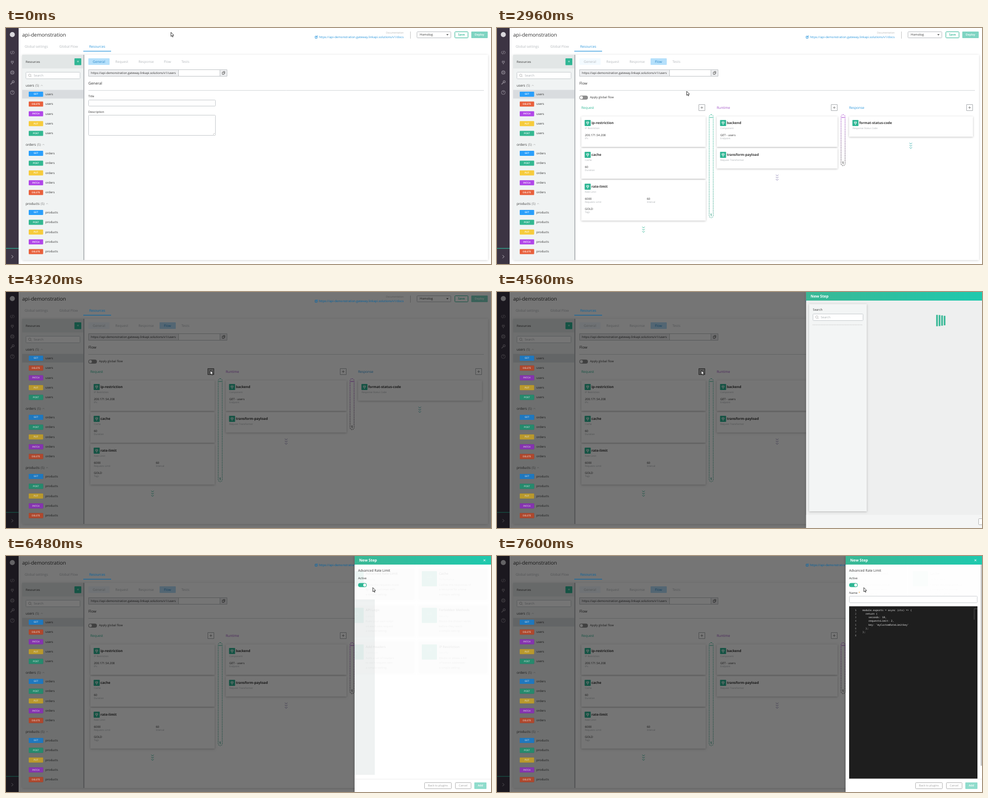
An HTML page with a canvas that plays this animation: 960x467 px, repeating every 8000 ms.

```html
<!DOCTYPE html>
<html lang="en">
<head>
<meta charset="utf-8">
<title>Gateway flow editor</title>
<style>
html, body { margin: 0; width: 100%; height: 100%; overflow: hidden; background: #fff; }
canvas { display: block; }
</style>
</head>
<body>
<canvas id="stage" width="960" height="467"></canvas>
<script>
const ctx = document.getElementById('stage').getContext('2d');
const LOOP = 8000, STEP = 80;
const SANS = '"Open Sans", "Noto Sans", sans-serif';
const MONO = '"Noto Sans Mono", "DejaVu Sans Mono", monospace';
const GREEN = '#2fb694', BLUE = '#2a96dc', INK = '#333', PALE = '#a9adb1';
const BADGE = { GET: '#2a9ffb', DELETE: '#e8603c', PATCH: '#b146e8', PUT: '#f6cb3c', POST: '#33b791' };
const URL_BASE = 'https://api-demonstration.gateway.linkapi.solutions/v1/';

const clamp = v => Math.max(0, Math.min(1, v));
const ease = v => v * v * (3 - 2 * v);
const span = (t, a, b) => clamp((t - a) / (b - a));

// y is the middle of the lowercase letters
function text(s, x, y, size, color = INK, o = {}) {
  ctx.font = `${o.italic ? 'italic ' : ''}${o.weight || 400} ${size}px ${o.font || SANS}`;
  ctx.textAlign = o.align || 'left';
  ctx.fillStyle = color;
  ctx.fillText(s, x, y + size * 0.31);
}
function box(x, y, w, h, fill, stroke, r = 0) {
  ctx.beginPath();
  ctx.roundRect(x, y, w, h, r);
  if (fill) { ctx.fillStyle = fill; ctx.fill(); }
  if (stroke) { ctx.strokeStyle = stroke; ctx.lineWidth = 1; ctx.stroke(); }
}
function line(points, color, width = 1, dash = []) {
  ctx.beginPath();
  points.forEach(([x, y], i) => i ? ctx.lineTo(x, y) : ctx.moveTo(x, y));
  ctx.strokeStyle = color;
  ctx.lineWidth = width;
  ctx.setLineDash(dash);
  ctx.stroke();
  ctx.setLineDash([]);
}
function ring(x, y, r, color, width = 1) {
  ctx.beginPath();
  ctx.arc(x, y, r, 0, 7);
  ctx.strokeStyle = color;
  ctx.lineWidth = width;
  ctx.stroke();
}
function dot(x, y, r, color) {
  ctx.beginPath();
  ctx.arc(x, y, r, 0, 7);
  ctx.fillStyle = color;
  ctx.fill();
}
function shadowed(draw, blur = 4, color = 'rgba(0,0,0,.24)', dy = 1) {
  ctx.save();
  ctx.shadowColor = color;
  ctx.shadowBlur = blur;
  ctx.shadowOffsetY = dy;
  draw();
  ctx.restore();
}
function faded(alpha, draw) {
  if (alpha <= 0) return;
  ctx.save();
  ctx.globalAlpha *= alpha;
  draw();
  ctx.restore();
}
function plug(x, y, k, color) {
  ctx.save();
  ctx.translate(x, y);
  ctx.scale(k, k);
  line([[-1.4, -3.6], [-1.4, -1.4]], color);
  line([[1.4, -3.6], [1.4, -1.4]], color);
  line([[-3, -1.2], [3, -1.2]], color);
  ctx.beginPath();
  ctx.arc(0, -0.8, 2.3, 0, Math.PI);
  ctx.stroke();
  line([[0, 1.5], [0, 3.8]], color);
  ctx.restore();
}
function glass(x, y) {
  ring(x, y, 2.4, '#aaa', 0.8);
  line([[x + 1.8, y + 1.8], [x + 3.6, y + 3.6]], '#aaa', 0.8);
}
function searchBox(x, y, w, h) {
  box(x + .5, y + .5, w, h, '#fff', '#c6cbce', 1);
  glass(x + 8, y + h / 2);
  text('Search', x + 16, y + h / 2 + .7, 6, PALE);
}
function toggle(x, y, on) {
  box(x, y, 17, 8, on ? GREEN : '#8d8d8d', null, 4);
  dot(x + (on ? 13 : 4), y + 4, 2.9, '#fff');
}

function nav() {
  const c = '#918b96';
  box(0, 0, 25, 467, '#3c3443');
  dot(12.5, 13, 5, '#d9d7dc');
  line([[10.5, 45.5], [8.5, 48.5], [10.5, 51.5]], c);
  line([[13.3, 45], [11.7, 52]], c);
  line([[14.5, 45.5], [16.5, 48.5], [14.5, 51.5]], c);
  plug(12.5, 68, 1, c);
  ring(12.5, 88, 3.2, c, 1.3);
  ring(12.5, 88, 1.2, c, .8);
  line([[9, 111.5], [13, 107.5]], c, 1.6);
  ring(14.2, 106.3, 2, c, 1.2);
  ring(12.5, 127.7, 3.8, c);
  text('?', 12.5, 127.4, 5.5, c, { align: 'center', weight: 700 });
  box(0, 435.5, 25, 1.2, '#2fb99a');
  line([[11, 449.5], [14, 452.5], [11, 455.5]], '#c9c6cc');
}

function header() {
  text('api-demonstration', 32, 14, 10);
  text('Global settings', 37, 37, 6.7, '#b4b8bc');
  text('Global Flow', 105.5, 37, 6.8, '#b4b8bc');
  text('Documentation', 787, 10, 4.8, '#b0b0b0', { align: 'right' });
  line([[800.5, 7], [800.5, 21]], '#c4c4c4');
  box(813.5, 7.5, 67, 12, '#fff', '#b9bcc0', 1);
  text('Homolog', 819, 13.5, 6);
  ctx.beginPath();
  ctx.moveTo(871.5, 12); ctx.lineTo(876, 12); ctx.lineTo(873.7, 15);
  ctx.fillStyle = '#666';
  ctx.fill();
  box(888.5, 7.5, 26, 12, '#fff', GREEN, 1);
  text('Save', 901.5, 13.3, 6, GREEN, { align: 'center', weight: 600 });
  box(921, 7, 32.5, 13, '#7fd4c2', null, 1);
  text('Deploy', 937.2, 13.2, 5.6, '#fff', { align: 'center', weight: 600 });
}

const GROUPS = [
  ['users', 'GET DELETE PATCH PUT POST'],
  ['orders', 'GET POST PUT PATCH DELETE'],
  ['products', 'GET POST PUT PATCH DELETE']
];

// bright parts that stay vivid under the dark mask
function accents() {
  GROUPS.forEach(([, verbs], g) => verbs.split(' ').forEach((verb, i) => {
    const y = 131 + g * 117 + i * 19.4;
    box(45, y - 5, 28.5, 10, BADGE[verb], null, 1);
    text(verb, 59.2, y, 4.7, '#fff', { align: 'center', weight: 600 });
  }));
  text('Resources', 164.7, 37, 6.65, BLUE);
  box(153, 45.3, 55, 1.3, BLUE);
  text(URL_BASE + 'docs', 787, 18, 6, BLUE, { align: 'right' });
  box(612, 16.2, 3.8, 4, null, BLUE);
  line([[614, 18], [617, 15]], BLUE);
}

function sidebar() {
  shadowed(() => box(32, 53, 922, 406, '#fff'), 5, 'rgba(0,0,0,.17)');
  box(32, 53, 122, 406, '#f0f3f3');
  box(32, 53, 122, 27, '#e2e6e6');
  text('Resources', 39, 66.8, 5.95);
  box(135.5, 60, 13.5, 13.5, GREEN, null, 1);
  text('+', 142.2, 66.3, 8, '#fff', { align: 'center' });
  searchBox(39, 87, 107, 13);
  box(32, 122.5, 121, 17, '#d9dcdf');
  box(153, 53, 2.2, 406, '#b7bbbe');
  GROUPS.forEach(([name, verbs], g) => {
    const top = 114 + g * 117;
    text(name, 39, top, 6.6);
    const end = 39 + ctx.measureText(name).width;
    text('(5)', end + 2.3, top, 6.4, '#777');
    line([[end + 13, top + .5], [end + 15, top - 1], [end + 17, top + .5]], '#aaa', .7);
    verbs.split(' ').forEach((v, i) => text(name, 78, top + 17 + i * 19.4, 6));
  });
}

function tabs(k) {
  faded(k < 1 ? 1 - k * .84 : .16, () => box(163, 60, 42, 13, '#b5e0fb', null, 1));
  faded(k, () => box(304, 60, 32, 13, '#b5e0fb', null, 1));
  const names = [['General', 184], ['Request', 229.2], ['Response', 277.3], ['Flow', 319.7], ['Tests', 355]];
  names.forEach(([s, x]) => {
    const on = s === (k < .5 ? 'General' : 'Flow');
    text(s, x, 66.7, 6.7, on ? '#2c87c8' : '#b4b8bc', { align: 'center' });
  });
  box(163.5, 82.5, 260, 13, '#fff', '#bfc3c6');
  box(163.5, 82.5, 178, 13, '#eeeff1', '#bfc3c6');
  text(URL_BASE + 'users', 168, 89, 5.95);
  box(423.5, 82.5, 14, 13, '#eeeff1', '#bfc3c6');
  box(428.2, 87.3, 3.4, 4.4, '#fff', '#555');
  line([[430, 86], [433.2, 86], [433.2, 90.5]], '#555', .8);
  line([[163, 123.5], [946, 123.5]], '#d3d6d9');
}

function form() {
  text('General', 163, 109.3, 7.45);
  text('Title', 163, 135.5, 5.9);
  box(163.5, 142.5, 251, 12, '#fff', '#c5c9cc', 1);
  text('Description', 163, 166.5, 5.85);
  box(163.5, 172.5, 251, 40, '#fff', '#c5c9cc', 1);
  line([[410, 211], [413, 208]], '#999', .7);
}

function card(x, y, w, h, title, sub, fields = []) {
  shadowed(() => box(x, y, w, h, '#fff'));
  box(x + 6.5, y + 7, 12, 12, GREEN, null, 1);
  plug(x + 12.5, y + 13, .95, '#fff');
  text(title, x + 20, y + 12.7, 6.75, INK, { weight: 700 });
  text(sub, x + 7, y + 24, 4.75, PALE);
  fields.forEach(([value, label, dx, dy]) => {
    text(value, x + 7 + dx, y + 37 + dy, 5.8);
    text(label, x + 7 + dx, y + 44 + dy, 4.75, PALE);
  });
}
function column(name, x, right, color, hot) {
  text(name, x, 158, 6.65, color);
  box(right - 12.5, 151.5, 12, 12, hot ? '#b9b9b9' : '#fff', hot ? '#555' : '#a9adb0');
  line([[right - 9, 157.5], [right - 4, 157.5]], '#777', .8);
  line([[right - 6.5, 155], [right - 6.5, 160]], '#777', .8);
}
function chevrons(x, y, color) {
  for (let i = -1; i < 2; i++)
    line([[x - 2.6, y - 1.3 + i * 4.3], [x, y + 1 + i * 4.3], [x + 2.6, y - 1.3 + i * 4.3]], color);
}
function link(x, bottom, from, to) {
  const g = ctx.createLinearGradient(0, 171, 0, bottom);
  g.addColorStop(0, from);
  g.addColorStop(1, to);
  ctx.setLineDash([2, 1.4]);
  box(x, 171.5, 8, bottom - 171.5, null, g, 4);
  ctx.setLineDash([]);
  line([[x + 1, 177], [x + 7, 177]], from);
  line([[x + 4, bottom - 3], [x + 4, bottom - 8], [x + 2.6, bottom - 6.5]], to);
}
function flow(hot) {
  text('Flow', 163, 109.3, 7.45);
  toggle(163, 133.7, false);
  text('Apply global flow', 184, 137.5, 5.95);
  column('Request', 167, 412, GREEN, hot);
  column('Runtime', 435, 674, '#a050c4');
  column('Response', 697, 942, BLUE);
  card(167, 175, 246, 60, 'ip-restriction', 'IP Restriction', [['200.171.54.208', 'IPs', 0, 0]]);
  card(167, 238, 246, 60, 'cache', 'Cache', [['60', 'Duration', 0, 0]]);
  card(167, 301, 246, 80, 'rate-limit', 'Rate Limit',
    [['6000', 'Requests Limit', 0, 0], ['60', 'Interval', 122.5, 0], ['GOLD', 'Tags', 0, 20]]);
  card(435, 175, 239, 60, 'backend', 'Component', [['GET - users', 'Endpoint', 0, 0]]);
  card(435, 238, 239, 40, 'transform-payload', 'Request Transformer');
  card(697, 175, 245, 40, 'format-status-code', 'Response Status Code');
  link(420, 375.5, GREEN, '#2a9d80');
  link(681, 272.5, '#a63fd0', '#444');
  chevrons(290, 399, '#3dbb9b');
  chevrons(554.5, 296, '#8f86b4');
  chevrons(819, 233, '#41b3b0');
}

const PLUGINS = [
  ['Advanced Rate Limit', 'Security', 'Limits the requests made', 'by each customer with'],
  ['Cache', 'Performance', 'Caches the responses of', 'a resource for a time'],
  ['API Logic', 'Custom', 'Runs your own script', 'on each new request'],
  ['Forbidden Methods', 'Security', 'Blocks the chosen verbs', 'before they reach'],
  ['Add Headers', 'Transform', 'Adds a set of headers', 'to each request sent'],
  ['IP Restriction', 'Security', 'Blocks or allows a list', 'of known addresses']
];
function plugins(left) {
  PLUGINS.forEach(([name, kind, a, b], i) => {
    const x = left + (i % 2 ? 269 : 124), y = 23 + 72.5 * (i >> 1);
    shadowed(() => box(x, y, 136, 63, '#fff'), 3, 'rgba(0,0,0,.15)');
    box(x + 6, y + 7, 30, 30, GREEN, null, 1);
    plug(x + 21, y + 22, 2, '#fff');
    text(name, x + 40, y + 12, 6.4, INK, { weight: 600 });
    text(kind, x + 40, y + 23.5, 5, PALE);
    [a, b, 'a simple setting.'].forEach((s, n) => text(s, x + 40, y + 34 + n * 9.5, 5.6, '#777'));
  });
}
function drawerTop(left) {
  const g = ctx.createLinearGradient(left, 0, 960, 0);
  g.addColorStop(0, '#3ab895');
  g.addColorStop(1, '#1ec9ae');
  box(left, 0, 960 - left, 17, g);
  text('New Step', left + 9, 8.5, 7.5, '#fff', { weight: 700 });
}
function cross(x) {
  line([[x - 1.8, 6.7], [x + 1.8, 10.3]], '#fff');
  line([[x + 1.8, 6.7], [x - 1.8, 10.3]], '#fff');
}
function button(x, w, s) {
  box(x + .5, 448.5, w, 12, '#fff', '#b2b2b2', 1);
  text(s, x + w / 2 + .5, 454.3, 5.6, '#a2a2a2', { align: 'center' });
}
function footer(dx, back) {
  if (back) button(828 + dx, 53, 'Back to plugins');
  button(889 + dx, 31, 'Cancel');
  box(927 + dx, 448, 24, 13, '#8fdccc', null, 1);
  text('Add', 939 + dx, 454.2, 5.6, '#fff', { align: 'center', weight: 600 });
}

function picker(t) {
  const shift = 412 * Math.pow(1 - span(t, 4400, 4720), 2.69);
  const left = 548 + shift;
  shadowed(() => box(left, 0, 412, 467, '#eeefef'), 5, 'rgba(0,0,0,.3)', 0);
  box(left, 441, 412, 26, '#f4f5f5');
  shadowed(() => box(left + 6, 24, 114, 410, '#f3f5f5'), 4);
  text('Search', left + 13.5, 35, 6);
  searchBox(Math.round(left + 13), 43, 99, 13);
  line([[left + 13, 65], [left + 112, 65]], '#bbb', .8, [2, 1.2]);
  if (t < 4960) {
    for (let i = 0; i < 4; i++) {
      const h = 20 + 2.5 * Math.cos((t - 4560) / 130 - i * .7);
      box(left + 257.5 + i * 5, 56.5 - h / 2, 3.2, h, '#35b795');
    }
  } else faded(t < 5040 ? .6 : 1, () => plugins(left));
  drawerTop(left);
  cross(947 + shift);
  footer(shift, false);
}

const CODE = [
  'module.exports = async (ctx) => {', '  return {', '    seconds: 10,', '    requestsLimit: 2,',
  "    key: 'myCustomRateLimitkey'", '  };', '};', ''
];
function editor(ready) {
  box(697, 99.5, 254, 341, '#1e1e1e');
  if (!ready) return;
  CODE.forEach((row, i) => {
    const y = 107.3 + i * 7.22;
    text(String(i + 1), 711.5, y, 4.9, i ? '#9a9a9a' : '#e4e4e4', { font: MONO, align: 'right' });
    text(row, 723.5, y, 4.95, '#ececec', { font: MONO });
  });
  line([[944.5, 104], [944.5, 126]], '#5a5a5a', .8);
  line([[944.5, 104.5], [951, 104.5]], '#5a5a5a', .8);
}
function settings(t) {
  shadowed(() => box(690, 0, 270, 467, '#fff'), 5, 'rgba(0,0,0,.3)', 0);
  ctx.save();
  ctx.beginPath();
  ctx.rect(690, 17, 270, 424);
  ctx.clip();
  const k = 1 - span(t, 6480, 7280);
  faded(k, () => box(690, 86, 40, 347, '#eff2f2'));
  faded(.02 + .06 * k, () => plugins(548));
  ctx.restore();
  drawerTop(690);
  cross(947);
  text('Advanced Rate Limit', 697, 28.5, 6.7);
  text('Active', 697, 44.5, 6);
  toggle(697, 53.5, true);
  if (t >= 6640) {
    text('Name', 697, 73, 5.9);
    text('*', 715.5, 73.5, 6, '#f0a030');
    box(697.5, 79.5, 253, 13, '#fff', '#cdd0d3', 1);
  }
  if (t >= 6800) {
    editor(t >= 6960);
    box(957.4, 17, 2.6, 398, '#c3c3c3');
  }
  box(690, 441, 270, 26, '#fff');
  line([[690, 441.5], [960, 441.5]], '#ececec');
  footer(0, true);
}

function arrow(x, y) {
  ctx.beginPath();
  [[0, 0], [0, 8.2], [1.9, 6.5], [3.1, 9.3], [4.4, 8.7], [3.2, 6], [5.6, 5.8]]
    .forEach(([a, b]) => ctx.lineTo(x + a, y + b));
  ctx.closePath();
  ctx.fillStyle = '#fff';
  ctx.fill();
  ctx.strokeStyle = '#222';
  ctx.lineWidth = .9;
  ctx.stroke();
}
function hand(x, y) {
  ctx.beginPath();
  [[-.9, 0], [.9, 0], [1, 4], [4.6, 5], [5.2, 6.2], [4.6, 9.2], [4, 11.8], [-1, 11.8], [-1.6, 9.8], [-3.6, 7], [-2.6, 6], [-.9, 7.4]]
    .forEach(([a, b]) => ctx.lineTo(x + a, y + b));
  ctx.closePath();
  ctx.fillStyle = '#fff';
  ctx.fill();
  ctx.strokeStyle = '#222';
  ctx.lineWidth = .9;
  ctx.stroke();
  line([[x + 1, y + 4], [x + 1, y + 6.6]], '#222', .6);
  line([[x + 2.8, y + 4.8], [x + 2.8, y + 6.8]], '#222', .6);
}
const MOVES = [
  [160, 960, 322, 69], [2480, 3280, 404.5, 155.5], [5120, 5280, 449, 143], [5360, 5920, 726, 62.5]
];
function cursor(t) {
  let x = 326.5, y = 8.5;
  for (const [a, b, tx, ty] of MOVES) {
    const k = ease(span(t, a, b));
    x += (tx - x) * k;
    y += (ty - y) * k;
  }
  const overTab = t >= 800 && t < 2720;
  const overPlus = t >= 3200 && t < 4320;
  const overCard = t >= 5840 && t < 6480;
  (overTab || overPlus || overCard ? hand : arrow)(x, y);
}

function draw(t) {
  ctx.textRendering = 'geometricPrecision';
  box(0, 0, 960, 467, '#fff');
  nav();
  header();
  sidebar();
  accents();
  tabs(span(t, 1840, 2160));
  if (t < 1760) form(); else flow(t >= 3680 && t < 5200);
  if (t >= 4320) {
    box(0, 0, 960, 467, 'rgba(0,0,0,.54)');
    faded(.55, accents);
  }
  if (t >= 6480) settings(t);
  else if (t >= 4480) picker(t);
  cursor(t);
}

function tick() {
  const t = performance.now() % LOOP;
  draw(Math.floor(t / STEP) * STEP);
  requestAnimationFrame(tick);
}
tick();
</script>
</body>
</html>
```
